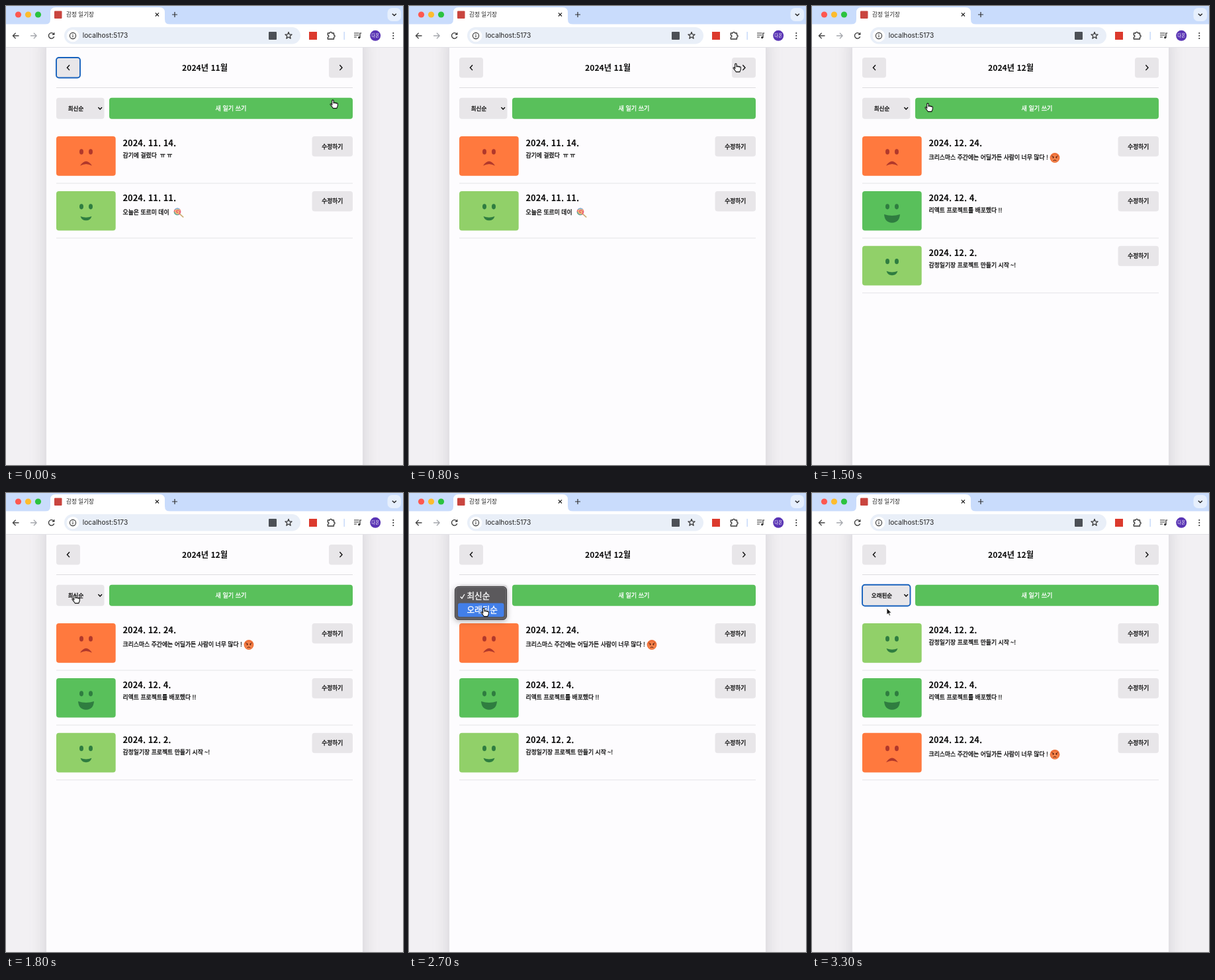
These frames come from a looping animation (600x694 px, 3400 ms). An HTML page:

```html
<!DOCTYPE html>
<html lang="ko">
<head>
<meta charset="utf-8">
<title>감정 일기장</title>
<style>
  html, body { margin: 0; width: 100%; height: 100%; overflow: hidden; background: #f2f0f3; }
  svg { display: block; width: 600px; height: 694px; }
  text { font-family: "Noto Sans CJK KR", "Noto Sans CJK", "Noto Sans", sans-serif; white-space: pre; }
  .pen { stroke: currentColor; stroke-width: .3px; }
  .card { filter: drop-shadow(0 5px 12px rgba(100, 100, 111, .24)); }
  .menu { filter: drop-shadow(0 2px 4px rgba(0, 0, 0, .3)); }
</style>
</head>
<body>
<svg id="stage" viewBox="0 0 600 694"></svg>
<script>
const LOOP = 3400, STEP = 100;
const INK = '#0c0c0c', GRAY = '#e8e6e9', GREEN = '#59c05b';

const rect = (x, y, w, h, fill, r = 0, more = '') =>
  `<rect x="${x}" y="${y}" width="${w}" height="${h}" rx="${r}" fill="${fill}" ${more}/>`;
const circle = (x, y, r, fill, more = '') => `<circle cx="${x}" cy="${y}" r="${r}" fill="${fill}" ${more}/>`;
const line = (d, color = '#333', w = 1.3, more = '') =>
  `<path d="${d}" fill="none" stroke="${color}" stroke-width="${w}" ${more}/>`;
const shape = (d, fill) => `<path d="${d}" fill="${fill}"/>`;
const at = (x, y, body) => `<g transform="translate(${x} ${y})">${body}</g>`;
const group = (id, body, cls = '') => `<g id="${id}" class="${cls}">${body}</g>`;
// y is the visual middle of the glyphs
const text = (x, y, size, s, more = '') =>
  `<text x="${x}" y="${y + size * .37}" font-size="${size}" ${more}>${s}</text>`;
const mid = 'text-anchor="middle"';
const pen = (color = INK) => `class="pen" fill="${color}" color="${color}"`;
const ring = (id, x, y, w, h) => group(id,
  rect(x, y, w, h, 'none', 4, 'stroke="#1862bd" stroke-width="1.9"'));

const MOODS = {
  bad: { bg: '#ff793e', ink: '#b1382b', mouth: 'M36 44.5Q45 31 54 44.5Q45 39.5 36 44.5Z' },
  good: { bg: '#91d069', ink: '#2f7d40', mouth: 'M36.5 38Q45 41.5 53.5 38Q51.5 44.4 45 44.4Q38.5 44.4 36.5 38Z' },
  great: { bg: GREEN, ink: '#2f7d40', mouth: 'M33 35.2Q45 39.2 57 35.2Q56 47.8 45 47.8Q34 47.8 33 35.2Z' }
};

const candy = circle(0, 0, 5.4, '#e9667a') +
  line('M0 0C1-2 3 0 2 2S-3 3-3-.5S2-5 4.2-1.5', '#f6d873', 1.3) +
  line('M-4.6 0A4.6 4.6 0 0 0 2 4.2', '#62b9a1', 1.5) +
  line('M-3.5-3A4.6 4.6 0 0 1 3-3.5', '#79b4dd', 1.4);
const EMOJI = {
  candy: line('M3 3L9.2 8.6', '#c9a86b', 1.6) + candy,
  angry: circle(0, 0, 7.4, '#ee6f38') + circle(0, 1, 5.6, '#f4834a') +
    line('M-4.6-2.8L-1.2-1.1M4.6-2.8L1.2-1.1', '#5c1c10', 1) +
    circle(-2.5, -.3, 1, '#5c1c10') + circle(2.5, -.3, 1, '#5c1c10') +
    line('M-2.4 4.4Q0 2.2 2.4 4.4', '#5c1c10', 1)
};

function entry([mood, date, note, emoji, ex], i) {
  const { bg, ink, mouth } = MOODS[mood];
  const eye = x => `<ellipse cx="${x}" cy="23.4" rx="3" ry="4.1" fill="${ink}"/>`;
  return at(76, 197 + i * 82.9,
    rect(0, 0, 89.7, 59.7, bg, 4) + eye(38) + eye(52) + shape(mouth, ink) +
    text(100.5, 10.6, 12.9, date, 'font-weight="700"') +
    text(100.5, emoji ? 32 : 29.2, 8.85, note, pen()) +
    (emoji ? at(ex, emoji === 'candy' ? 31 : 32.5, EMOJI[emoji]) : '') +
    rect(386.5, 0, 61.5, 30.5, GRAY, 4) +
    text(417.3, 15.3, 8.7, '수정하기', mid + pen()) +
    rect(0, 70.6, 448, .9, '#e2e1e4'));
}

const november = [
  ['bad', '2024. 11. 14.', '감기에 걸렸다  ㅠ ㅠ'],
  ['good', '2024. 11. 11.', '오늘은 또르미 데이', 'candy', 183]
];
const december = [
  ['bad', '2024. 12. 24.', '크리스마스 주간에는 어딜가든 사람이 너무 많다 !', 'angry', 291],
  ['great', '2024. 12. 4.', '리액트 프로젝트를 배포했다 !!'],
  ['good', '2024. 12. 2.', '감정일기장 프로젝트 만들기 시작 ~!']
];
const list = (id, rows) => group(id, rows.map(entry).join(''));
const heading = (id, s) => group(id, text(300.5, 93, 12.2, s, mid + ' font-weight="700"'));
const choice = (id, s) => group(id, text(105.5, 155, 8.5, s, mid + pen()));

function browser() {
  const tab = 'M59 28Q67 28 67 20V10Q67 2 75 2H232Q240 2 240 10V20Q240 28 248 28Z';
  const star = Array.from({ length: 10 }, (_, i) => {
    const r = i % 2 ? 2.3 : 5.4, a = i * Math.PI / 5;
    return `${(r * Math.sin(a)).toFixed(2)} ${(-r * Math.cos(a)).toFixed(2)}`;
  }).join('L');
  return rect(0, 0, 600, 28, '#c9dcfc') + rect(0, 27.5, 600, 34.5, '#fff') +
    rect(0, 62, 600, 1, '#e1e1e6') +
    ['#fe5850', '#fdbc2e', '#2bc33f'].map((c, i) => circle(18.5 + 15 * i, 13, 4.6, c)).join('') +
    shape(tab, '#fff') +
    rect(73, 7.5, 11.5, 11.5, '#c9453f', 1) +
    text(91, 13, 8.6, '감정 일기장', 'fill="#222"') +
    line('M225.8 10.3L231 15.5M231 10.3L225.8 15.5', '#222', 1.2) +
    line('M251 13H259M255 9V17', '#333', 1.2) +
    rect(576.5, 3, 20.5, 20, '#e6effd', 7) + line('M583.8 11.7L586.8 14.5L589.8 11.7', '#222', 1.4) +
    line('M19.5 45H10.5M14.6 40.8L10.4 45L14.6 49.2', '#444') +
    line('M37 45H46M41.9 40.8L46.1 45L41.9 49.2', '#a5a8ad') +
    line('M72 42.3A4.2 4.2 0 1 0 72.7 46.2M72.8 40.3V43.2H69.8', '#333') +
    rect(88, 32, 357, 25.5, '#e9eff8', 12.7) + circle(101, 45, 9.3, '#fff') +
    circle(101, 45, 4.6, 'none', 'stroke="#333" stroke-width="1.1"') +
    line('M101 44.3V47.4M101 42.3V43.4', '#333', 1.1) +
    text(115.7, 44.7, 10.2, 'localhost:5173', 'style="font-family:Inter,sans-serif" fill="#222"') +
    rect(397, 39, 12, 12, '#4c5056', 1) +
    at(427, 44.8, line('M' + star + 'Z', '#333', 1.2, 'stroke-linejoin="round"')) +
    rect(458, 39, 12, 12, '#dc3a2d') +
    line('M486.3 41H489.3A1.6 1.6 0 0 1 492.5 41H495.5V44A1.6 1.6 0 0 1 495.5 47.2V50H486.3V47.2A1.6 1.6 0 0 0 486.3 44Z', '#333', 1.3, 'stroke-linejoin="round"') +
    rect(510.6, 39, 1.1, 12, '#b4cef8') +
    line('M526 41H533.5M526 44H533.5M526 47H530M535 48V41H537.3', '#333', 1.2) + circle(533.7, 47.7, 1.6, '#333') +
    circle(558.2, 44.8, 8, '#5934b4') + text(558.2, 44.8, 6.4, '다온', mid + ' fill="#fff"') +
    [41, 45, 49].map(y => circle(585.3, y, 1.1, '#333')).join('');
}

function menu() {
  const item = (id, y, s) => group(id, rect(74, y - 10.5, 69.5, 20.8, '#427fe9', 3)) +
    text(87.5, y - .6, 12.6, s, pen('#fff'));
  return group('menu',
    rect(69.5, 141.5, 78, 50, '#5b595c', 5.5, 'stroke="#39383a"') +
    rect(70.5, 142.5, 76, 48, 'none', 5, 'stroke="#7a787b" stroke-width=".8"') +
    item('hotNew', 156.3, '최신순') + item('hotOld', 177, '오래된순') +
    line('M77.7 156.8L80 159.4L84 153', '#fff', 1.3), 'menu');
}

function cursors() {
  const hand = 'M-1.3 8V1.3A1.2 1.2 0 0 1 1.1 1.3V5A1.1 1.1 0 0 1 3.3 5A1.1 1.1 0 0 1 5.4 5.5A1 1 0 0 1 7.3 6.3V8.5C7.3 10.5 6 11 6 12.6H.2C.2 11.5-2.5 9.5-3.8 7.2C-4.4 6-3 5.3-2.2 6.2Z';
  const arrow = 'M0 0V10L2.3 7.9L3.9 11.5L5.4 10.8L3.9 7.3H7Z';
  const draw = (id, d, fill, edge, w) => group(id,
    `<path d="${d}" fill="${fill}" stroke="${edge}" stroke-width="${w}" stroke-linejoin="round"/>`);
  return group('cursor',
    draw('hand', hand, '#fff', '#111', 1.1) + draw('arrow', arrow, '#111', '#fff', .8));
}

const stage = document.getElementById('stage');
stage.innerHTML =
  rect(0, 0, 600, 694, '#f2f0f3') +
  rect(61, 40, 478, 700, '#fdfcfe', 0, 'class="card"') +
  `<g fill="${INK}">` +
  rect(76, 78, 36, 30.5, GRAY, 4) + rect(488, 78, 36, 30.5, GRAY, 4) +
  line('M96 89.3L92.4 93.2L96 97.1', INK, 1.4) + line('M504.4 89.3L508 93.2L504.4 97.1', INK, 1.4) +
  ring('ringPrev', 76, 78, 36, 30.5) +
  heading('titleNov', '2024년 11월') + heading('titleDec', '2024년 12월') +
  rect(76, 123, 448, 1, '#dddce0') +
  rect(76, 138.8, 72.5, 32, GRAY, 4) + line('M139.4 153.3L142.2 156.2L145 153.3', INK, 1.5) +
  choice('newest', '최신순') + choice('oldest', '오래된순') +
  ring('ringSort', 76, 138.8, 72.5, 32) +
  rect(156, 138.8, 368, 32, GREEN, 4) +
  text(340, 155, 9.1, '새 일기 쓰기', mid + pen('#fff')) +
  list('nov', november) + list('dec', december) + list('decOld', [...december].reverse()) +
  '</g>' + browser() + menu() + cursors();

const $ = id => document.getElementById(id);
const show = (id, on) => $(id).setAttribute('visibility', on ? 'visible' : 'hidden');

// time, x, y of the pointer tip
const PATH = [
  [0, 494, 142], [100, 494, 142], [500, 494, 87], [1000, 494, 87],
  [1500, 175, 147], [1700, 104, 154], [2300, 104, 154], [2600, 113, 174], [3400, 113, 174]
];
const BUTTONS = [[488, 78, 36, 30], [156, 139, 368, 32], [76, 139, 72, 32]];

function pointer(t) {
  const i = PATH.findIndex(p => p[0] > t);
  const [t0, x0, y0] = PATH[i - 1], [t1, x1, y1] = PATH[i];
  const u = (t - t0) / (t1 - t0), e = u * u * (3 - 2 * u);
  return [x0 + (x1 - x0) * e, y0 + (y1 - y0) * e];
}

function render(t) {
  const dec = t >= 900, sorted = t >= 3100, open = t >= 1900 && !sorted;
  const [x, y] = pointer(t);
  const over = BUTTONS.some(([bx, by, w, h]) => x >= bx && x <= bx + w && y >= by && y <= by + h);
  const hand = over || open;
  const old = y > 165;
  show('ringPrev', t < 800);
  show('titleNov', !dec);
  show('titleDec', dec);
  show('nov', !dec);
  show('dec', dec && !sorted);
  show('decOld', sorted);
  show('newest', !sorted);
  show('oldest', sorted);
  show('ringSort', sorted);
  show('menu', open);
  show('hotNew', open && !old);
  show('hotOld', open && old);
  $('menu').setAttribute('opacity', t >= 3000 ? .1 : t >= 2900 ? .6 : 1);
  show('hand', hand);
  show('arrow', !hand);
  $('cursor').setAttribute('transform', `translate(${x.toFixed(1)} ${y.toFixed(1)})`);
}

const start = performance.now();
function tick() {
  const t = (performance.now() - start) % LOOP;
  render(Math.floor(t / STEP) * STEP);
  requestAnimationFrame(tick);
}
tick();
</script>
</body>
</html>
```
